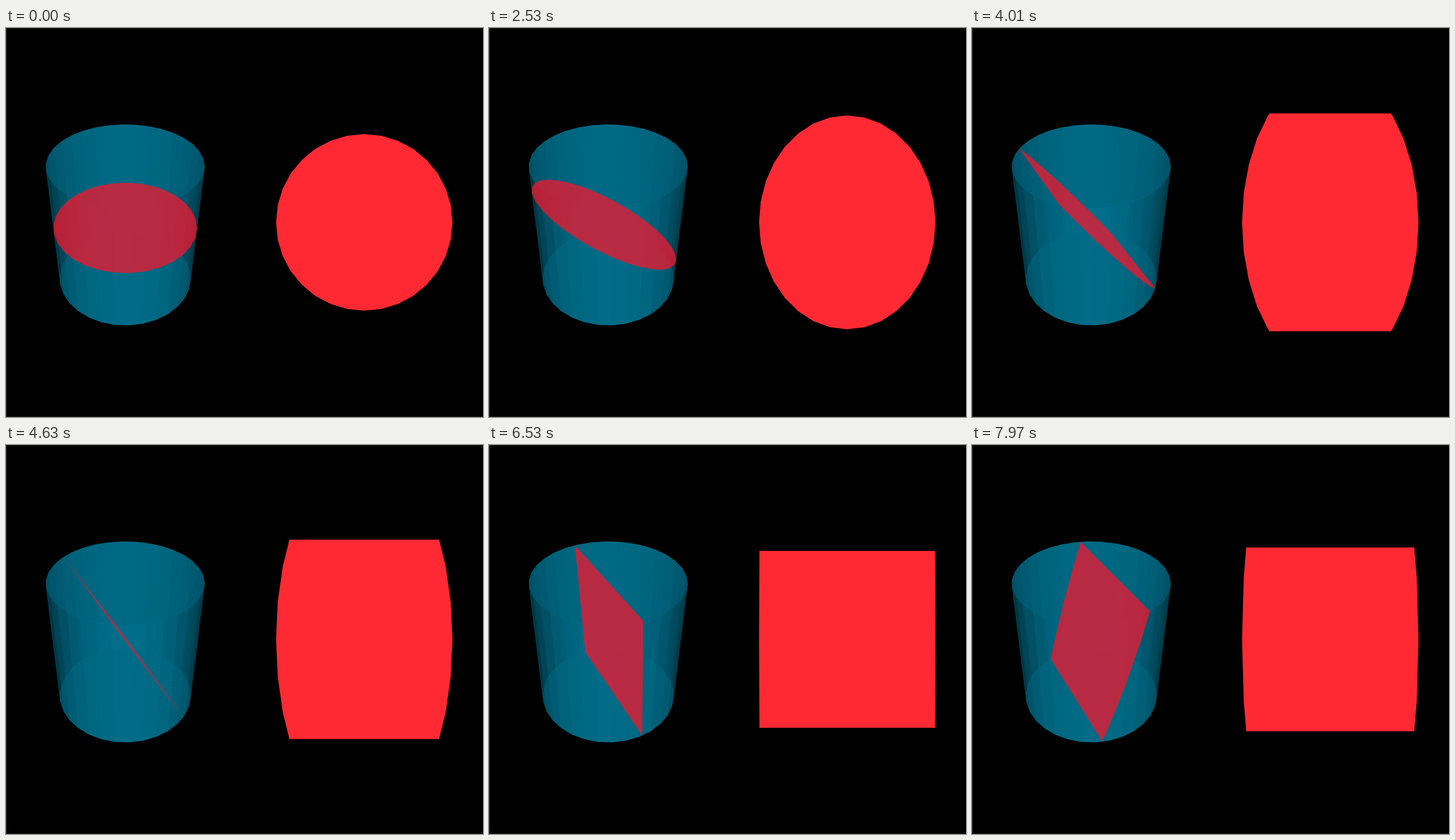
Write an HTML page with a canvas that moves like this. It is 829 px wide and 675 px high and loops after 8 s.

```html
<!DOCTYPE html>
<html lang="en">
<head>
<meta charset="utf-8">
<title>Plane cutting a cylinder</title>
<style>
  html, body { margin: 0; width: 100%; height: 100%; overflow: hidden; background: #000; }
  canvas { display: block; }
</style>
</head>
<body>
<canvas id="stage" width="829" height="675"></canvas>
<script>
const W = 829, H = 675, LOOP = 8000;
const SIDES = 32, STEP = 2 * Math.PI / SIDES;
const RAD = Math.PI / 180;

// Camera looks down at the cylinder (radius 1, half height 1).
const cam = { x: 207.25, y: 337.5, focal: 809, dist: 6.53, sin: 0.6245, cos: 0.781 };
// Front view of the cut face.
const face = { x: 622.6, y: 337.25, scale: 153.25 };
// Horizontal axis the plane turns about.
const AXIS = 64.4 * RAD;
const ax = Math.cos(AXIS), az = Math.sin(AXIS);

const ctx = document.getElementById('stage').getContext('2d');

function project(x, y, z) {
  const k = cam.focal / (cam.dist - y * cam.sin - z * cam.cos);
  return [cam.x + x * k, cam.y - (y * cam.cos - z * cam.sin) * k];
}

function polygon(c, points, color, seam) {
  c.beginPath();
  points.forEach(p => c.lineTo(p[0], p[1]));
  c.closePath();
  c.fillStyle = color;
  c.fill();
  if (seam) {
    c.strokeStyle = color;
    c.lineWidth = 0.6;
    c.stroke();
  }
}

const teal = k => `rgb(0,${Math.round(147 * k)},${Math.round(184 * k)})`;

function makeCanvas() {
  const c = document.createElement('canvas');
  c.width = W;
  c.height = H;
  return c;
}

// Each layer is painted opaque, then blended as a whole so facets leave no seams.
function blendLayer(target, paint) {
  const layer = makeCanvas();
  paint(layer.getContext('2d'));
  target.globalAlpha = 0.5;
  target.drawImage(layer, 0, 0);
}

const rim = (i, y) => {
  const a = AXIS + i * STEP;
  return project(Math.cos(a), y, Math.sin(a));
};

function wall(front) {
  return c => {
    for (let i = 0; i < SIDES; i++) {
      const a = AXIS + (i + 0.5) * STEP;
      // The facet midpoint lies on the inscribed circle.
      const facing = cam.dist * cam.cos * Math.sin(a) - Math.cos(STEP / 2) > 0;
      if (facing !== front) continue;
      const quad = [rim(i, 1), rim(i + 1, 1), rim(i + 1, -1), rim(i, -1)];
      polygon(c, quad, teal(0.36 + 0.64 * Math.abs(Math.sin(a))), true);
    }
  };
}

function cap(y) {
  return c => polygon(c, Array.from({ length: SIDES }, (_, i) => rim(i, y)), teal(0.93));
}

const cylinder = makeCanvas();
const cylinderCtx = cylinder.getContext('2d');
[wall(false), cap(-1), wall(true), cap(1)].forEach(p => blendLayer(cylinderCtx, p));

// Half width of the regular polygon at distance q from its axis.
function halfWidth(q) {
  q = Math.abs(q);
  const i = Math.min(SIDES / 4 - 1, Math.floor(Math.asin(q) / STEP));
  const a = i * STEP, b = a + STEP;
  const f = (q - Math.sin(a)) / (Math.sin(b) - Math.sin(a));
  return Math.cos(a) + f * (Math.cos(b) - Math.cos(a));
}

// Outline of the cut as [along axis, across axis, height].
function section(angle) {
  const cot = (Math.cos(angle) || 1e-9) / Math.sin(angle);
  const limit = Math.min(1, Math.abs(cot));
  const levels = [-limit];
  for (let i = -SIDES / 4; i <= SIDES / 4; i++) {
    const q = Math.sin(i * STEP);
    if (Math.abs(q) < limit) levels.push(q);
  }
  levels.push(limit);
  const side = sign => levels.map(q => [sign * halfWidth(q), q, q / cot]);
  return [...side(1), ...side(-1).reverse()];
}

function drawBorder() {
  ctx.fillStyle = '#242424';
  ctx.fillRect(0, 0, W, 1);
  ctx.fillRect(0, H - 1, W, 1);
  ctx.fillStyle = '#383838';
  ctx.fillRect(0, 0, 1, H);
}

function draw(t) {
  const angle = (0.01368 * t - 4.6e-8 * t * t) * RAD;
  const cut = section(angle);

  ctx.fillStyle = '#000';
  ctx.fillRect(0, 0, W, H);
  drawBorder();
  ctx.drawImage(cylinder, 0, 0);

  polygon(ctx, cut.map(([p, q, y]) => project(p * ax - q * az, y, p * az + q * ax)),
    'rgba(242,23,47,0.76)');
  polygon(ctx, cut.map(([p, q, y]) => [
    face.x + p * face.scale,
    face.y - Math.sign(q) * Math.hypot(q, y) * face.scale
  ]), '#ff2933');
}

const start = performance.now();
function tick() {
  draw((performance.now() - start) % LOOP);
  requestAnimationFrame(tick);
}
tick();
</script>
</body>
</html>
```
